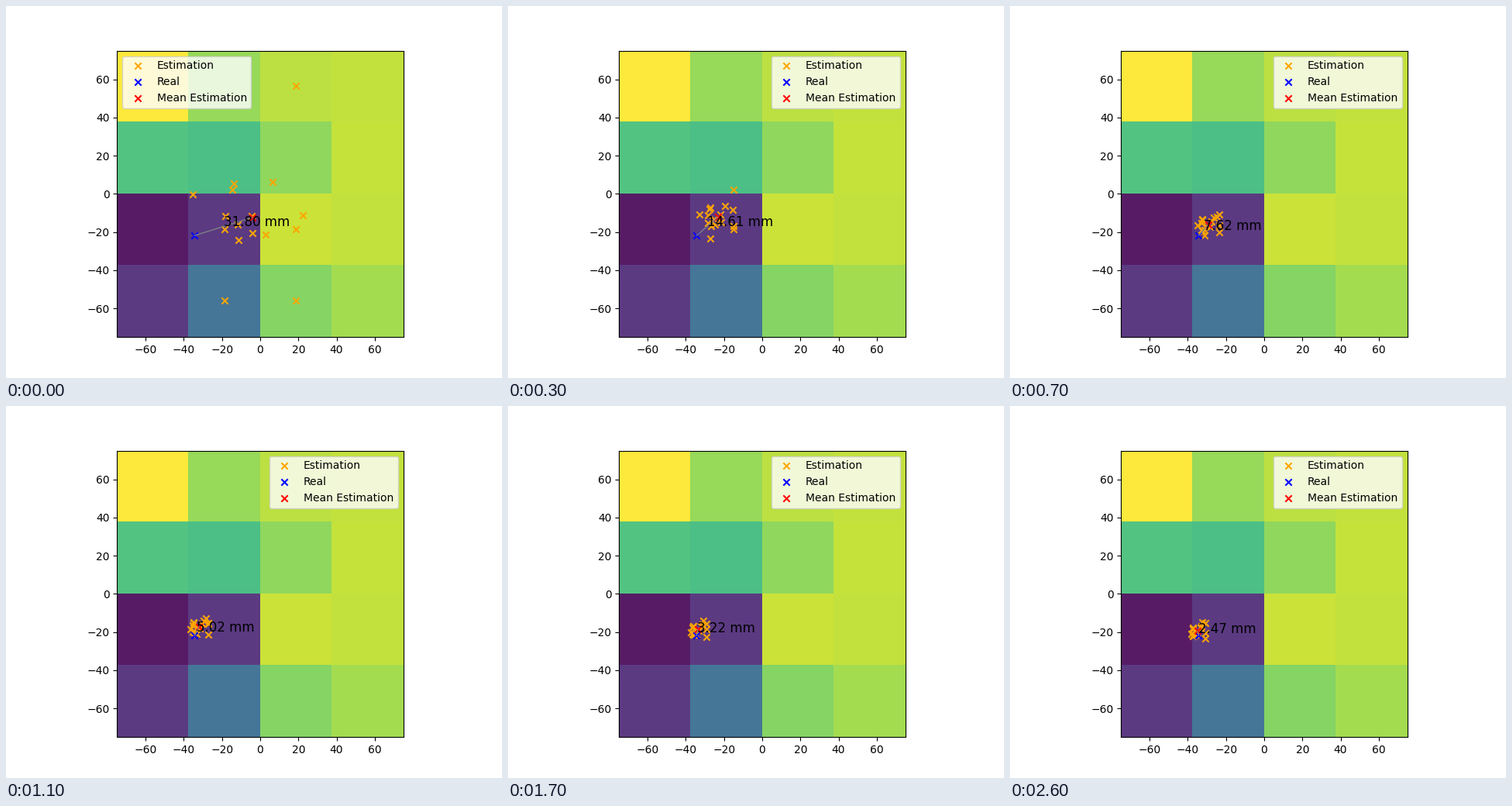
Write a matplotlib script that moves like this. It is 640x480 px and loops after 2.7 s.

```python
import numpy as np
import matplotlib.pyplot as plt
from matplotlib.animation import FuncAnimation

FRAMES, INTERVAL = 27, 100
HALF = 75
REAL = np.array([-34.3, -21.8])

CELLS = [
    [1.0, 0.827, 0.89, 0.9],
    [0.69, 0.67, 0.815, 0.905],
    [0.0, 0.098, 0.913, 0.9],
    [0.098, 0.335, 0.793, 0.85],
]

# Where estimates settle, each with the first guesses that end up there.
PATHS = [
    ((-37.3, -18.1), [(-13.8, 5.0), (-14.6, 1.8), (-18.3, -12.0)]),
    ((-37.3, -21.3), [(-35.3, -0.6), (-18.75, -18.75), (-11.4, -24.6),
                      (-3.9, -21.0)]),
    ((-33.7, -14.4), [(22.3, -11.6)]),
    ((-31.7, -13.2), [(18.75, -56.25)]),
    ((-31.7, -23.0), [(18.75, 56.25), (18.75, -18.75)]),
    ((-33.3, -17.3), [(6.4, 5.8), (-4.6, -12.0)]),
    ((-35.3, -19.3), [(-18.75, -56.25), (2.9, -21.8), (-11.8, -16.5)]),
]
START = np.array([s for _, starts in PATHS for s in starts])
FINAL = np.array([end for end, starts in PATHS for _ in starts])

# Sample count, distance of the mean from the real spot, its direction.
COUNTS, ERRORS, ANGLES = np.array([
    (1, 31.80, 17.4), (4, 14.61, 41), (8, 7.62, 48), (12, 5.02, 64),
    (18, 3.22, 79), (23, 2.58, 95), (27, 2.47, 104)]).T


def mean_at(count):
    """Distance and position of the mean after `count` samples."""
    x, keys = np.log(count), np.log(COUNTS)
    error = np.exp(np.interp(x, keys, np.log(ERRORS)))
    angle = np.radians(np.interp(x, keys, ANGLES))
    return error, REAL + error * np.array([np.cos(angle), np.sin(angle)])


def estimates_at(count, mean):
    """A first guess loses weight as 1 / count in a running average."""
    points = FINAL + (START - FINAL) / count
    return points - points.mean(axis=0) + mean


fig, ax = plt.subplots(figsize=(6.4, 4.8), dpi=100)
ax.imshow(CELLS, extent=(-HALF, HALF, -HALF, HALF), cmap="viridis",
          vmin=0, vmax=1, alpha=0.9)
estimates = ax.scatter(*START.T, c="orange", marker="x", label="Estimation")
ax.scatter(*REAL, c="blue", marker="x", label="Real")
mean_mark = ax.scatter(*REAL, c="red", marker="x", label="Mean Estimation")
link, = ax.plot([], [], color="gray", lw=1)
label = ax.text(0, 0, "", fontsize=12)
ax.set_xlim(-HALF, HALF)
ax.set_ylim(-HALF, HALF)
legend = ax.legend(loc="upper left")


def update(i):
    error, mean = mean_at(i + 1)
    estimates.set_offsets(estimates_at(i + 1, mean))
    mean_mark.set_offsets([mean])
    link.set_data(*zip(REAL, mean))
    label.set_position((REAL + mean) / 2)
    label.set_text(f"{error:.2f} mm")
    # At first a point in the upper right corner is in the legend's way.
    legend.set_loc("upper left" if i == 0 else "upper right")
    return estimates, mean_mark, link, label, legend


anim = FuncAnimation(fig, update, frames=FRAMES, interval=INTERVAL,
                     repeat=True, repeat_delay=0)
plt.show()
```
